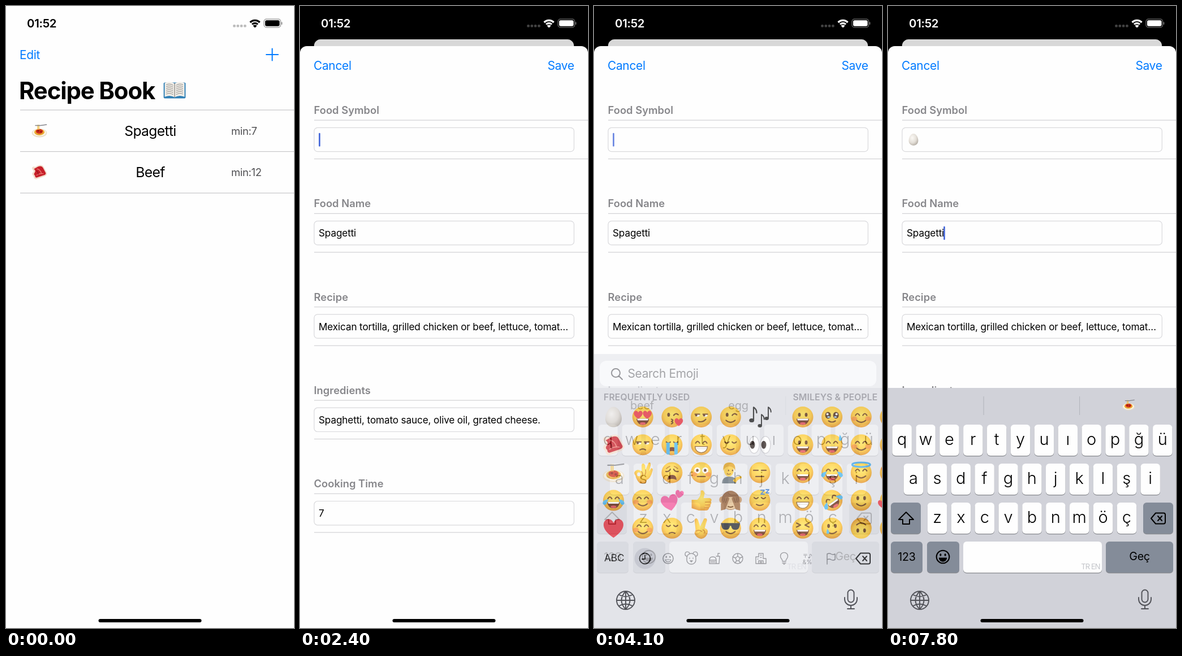
Animation of 509 by 1101 pixels, one loop 8000 ms. Source, as an HTML page:

```html
<!DOCTYPE html>
<html lang="en">
<head>
<meta charset="utf-8">
<title>Recipe Book</title>
<style>
  html, body { margin: 0; width: 100%; height: 100%; overflow: hidden; background: #000; }
  svg { display: block; width: 100vw; height: 100vh; }
  text { font-family: Inter, Roboto, sans-serif; font-optical-sizing: none; white-space: pre; }
  .ln { fill: none; stroke-linecap: round; stroke-linejoin: round; }
  .icon { fill: none; stroke-linecap: round; stroke-linejoin: round; }
  .key { fill: #fefefe; }
  .fn { fill: #a9aeb8; }
  .late .fn { fill: #848c99; }
</style>
</head>
<body>
<svg id="stage" viewBox="0 0 509 1101" preserveAspectRatio="none"></svg>
<script>
const LOOP = 8000, STEP = 100;
const BLUE = '#007aff', BROWN = '#5f3210';
const stage = document.getElementById('stage');

// Drawing helpers
const range = n => [...Array(n).keys()];
const path = (d, fill) => `<path d="${d}" fill="${fill}"/>`;
const ln = (d, color = '#6b3a10', w = 2.2) => `<path class="ln" d="${d}" stroke="${color}" stroke-width="${w}"/>`;
const oval = (x, y, rx, ry, fill, more = '') => `<ellipse cx="${x}" cy="${y}" rx="${rx}" ry="${ry}" fill="${fill}" ${more}/>`;
const rect = (x, y, w, h, rx, fill, more = '') => `<rect x="${x}" y="${y}" width="${w}" height="${h}" rx="${rx}" fill="${fill}" ${more}/>`;
const rule = (x1, y, x2, color) => rect(x1, y, x2 - x1, 1.2, 0, color);
const pair = s => `${s}<g transform="scale(-1 1)">${s}</g>`;
const at = (x, y, s, k = 1, turn = 0) => `<g transform="translate(${x} ${y}) rotate(${turn}) scale(${k})">${s}</g>`;
const use = (name, x, y, k = 1, id = '') => `<use ${id && `id="${id}"`} href="#${name}" transform="translate(${x} ${y}) scale(${k})"/>`;
const icon = (x, y, d, color, w = 2, k = 1) => at(x, y, `<path class="icon" d="${d}" stroke="${color}" stroke-width="${w}"/>`, k);
const txt = (x, y, s, size, fill = '#000', { weight = 400, anchor = 'start', space = -.015 } = {}) =>
  `<text x="${x}" y="${y}" font-size="${size}" fill="${fill}" font-weight="${weight}" text-anchor="${anchor}" style="letter-spacing:${space}em">${s}</text>`;
const mid = { anchor: 'middle' };

// Emoji parts, drawn in a box from -20 to 20
const heartPath = 'M0 17C-27-1-17-17-8-16Q-2-15 0-9Q2-15 8-16C17-17 27-1 0 17Z';
const heart = (color = '#ee3440') => path(heartPath, color);
const eyes = {
  dot: pair(oval(6, -4, 2.4, 3.6, BROWN)),
  happy: pair(ln('M3-3Q6.5-9 10-3')),
  shut: pair(ln('M3-5Q6.5-1 10-5')),
  flat: pair(ln('M3-4H11')),
  squint: pair(ln('M11-9L4-5.5 11-2')),
  droop: pair(ln('M3-6Q5-1 11-2') + ln('M4-11Q7-10 10-7', '#b3701a', 1.6)),
  side: pair(oval(7, -3, 4, 2.6, '#fff') + ln('M3-5H11')) + oval(5, -3, 2, 2, BROWN) + oval(-9, -3, 2, 2, BROWN),
  wide: pair(oval(7, -4, 5.5, 5.5, '#fff') + oval(7, -4, 2.3, 2.6, BROWN)),
  wet: pair(oval(7, -3, 5, 6, '#4a2a12') + oval(8, -5, 2, 2, '#fff') + oval(6, 0, 2.5, 1.5, '#9ecdf0')),
  wink: oval(-6, -4, 2.4, 3.6, BROWN) + ln('M3-3Q6.5-8 11-4'),
  love: pair(at(8, -4, heart(), .44))
};
const bowl = 'M-11 3H11A11 11 0 0 1-11 3Z';
const mouths = {
  smile: ln('M-8 6Q0 13 8 6'),
  small: ln('M-6 7Q0 11 6 7'),
  open: path(bowl, '#64270f') + path('M-10 3H10L9 6H-9Z', '#fff') + oval(0, 11.5, 5, 2.3, '#e5484f'),
  teeth: `<path d="${bowl}" fill="#fff" stroke="#8a5a24" stroke-width="1.4"/>` + ln('M-9 7H9', '#c9c2ba', .8),
  flat: ln('M-7 7H7'),
  frown: ln('M-5 9Q0 6 5 9'),
  smirk: ln('M-5 8Q3 10 8 4'),
  kiss: ln('M-1 4q5 1.5 0 4q5 1.5 0 4'),
  gape: path('M-8 13Q-8 4 0 4T8 13Q0 9-8 13Z', '#64270f')
};
const blush = pair(oval(12, 3, 5, 4, '#f0522f', 'opacity=".45"'));
const tear = '#45b4ee';
const tears = pair(path('M9-2Q20-1 19 6Q15 11 12 5Z', tear));
const face = (eye, mouth, more = '') => oval(0, 0, 18.5, 18.5, 'url(#skin)') + eyes[eye] + mouths[mouth] + more;
const joy = face('happy', 'open', tears);
const note = ln('M0 8V-12Q5-9 5-3', '#222', 2) + oval(-3, 9, 4, 3.2, '#222');

const art = {
  egg: path('M0-18C9-18 14.5-5 14.5 3C14.5 12 8 18 0 18S-14.5 12-14.5 3C-14.5-5-9-18 0-18Z', 'url(#shell)'),
  pasta: oval(0, 6, 19, 11, '#eadfca') + oval(0, 5, 17, 9, '#fbf5e6') + oval(0, 4, 13, 8, '#efb33a') +
    ln('M-11 6Q-6 12 0 10T11 6', '#d98f22', 1.4) + oval(0, 2, 9, 6, '#cf2f1b') + oval(-3, 1, 2.6, 2, '#8c1a12') + oval(4, 3, 2.4, 2, '#8c1a12') +
    ln('M-4-3V-14M-1-3V-14', '#efc04c', 2) + ln('M-10-13H3L18-15', '#85868c', 2.2),
  meat: path('M-19-10Q-17-16-11-13L-3-17Q7-20 11-13L19 2Q20 8 12 11L-7 18Q-14 18-14 12L-18 6Q-19 2-14-1Z', '#f3dccb') +
    path('M-14-8L-3-14Q6-17 9-11L16 2Q17 6 11 8L-7 14Q-11 14-11 9Q-16 6-11 0Q-9-5-14-8Z', '#c71f29') +
    ln('M-6-8Q2-7 5 3M-7 8Q0 3 10 4', '#ee8078', 1.6) + ln('M-7-3Q-2 0-3 6', '#8c121b', 1.6),
  heart: heart(),
  love: face('love', 'open'),
  kiss: face('wink', 'kiss', at(12, 9, heart(), .42)),
  smirk: face('side', 'smirk'),
  wink: face('wink', 'smile'),
  unamused: face('side', 'frown'),
  sob: face('shut', 'gape', pair(path('M4-4H10V16Q7 18 4 17Z', tear))),
  beam: face('happy', 'teeth'),
  relieved: face('shut', 'small'),
  weary: face('droop', 'gape'),
  flushed: face('wide', 'flat', blush),
  blank: face('flat', 'flat'),
  joy,
  rofl: at(0, 0, joy, 1, -35),
  blush: face('happy', 'smile', blush),
  pensive: face('shut', 'frown'),
  laugh: face('happy', 'open'),
  grin: face('dot', 'open'),
  squint: face('squint', 'open'),
  teary: face('wet', 'small'),
  sweat: face('happy', 'open', path('M14-18Q20-9 15-7T14-18Z', tear)),
  angel: face('happy', 'smile', oval(0, -14, 16, 4, 'none', 'stroke="#3aa5ea" stroke-width="3"')),
  slight: face('dot', 'smile'),
  smiletear: face('dot', 'smile', path('M-8 1Q-2 9-7 10T-8 1Z', tear)),
  upside: at(0, 0, face('dot', 'smile'), 1, 180),
  adore: face('happy', 'smile', blush + at(-15, 6, heart(), .4) + at(-9, 14, heart(), .35)),
  sleep: face('shut', 'small') + ln('M2-18H8L2-11H8M11-19H16L11-13H16', '#3977c9', 2),
  cool: face('dot', 'smile', path('M-17-9H17L16-4Q15 3 8 3Q2 3 1-4H-1Q-2 3-8 3Q-15 3-16-4Z', '#23272d')),
  notes: at(-11, -4, note, 1.1) + at(3, 7, note, .95) + at(15, -6, note, .95),
  eyes: pair(oval(10, 0, 9, 15, '#fff', 'stroke="#c9c9ce" stroke-width="1.4"')) + oval(-13, 0, 4.5, 7, '#2f2420') + oval(7, 0, 4.5, 7, '#2f2420'),
  loves: at(-4, 4, heart('#f2559a'), .85, -12) + at(13, -11, heart('#f2559a'), .42, 12),
  ok: path('M-5 19Q-11 14-13 5Q-17 0-13-3Q-8-7-2-2L-2-14Q1-19 4-13L5-5L10-17Q14-20 14-13L11-2L15-8Q19-8 17-2Q14 10 7 13L5 19Z', 'url(#skin)') +
    oval(-7, 3, 3, 3.4, '#e9eaef') + ln('M-2-2Q2 4-3 9M5-5Q6 0 4 4', '#c9750f', 1.4),
  thumb: path('M-17-1H-7Q0-8-1-17Q4-20 6-12L4-4H15Q20-2 17 2Q19 5 16 8Q17 11 14 13Q13 18 8 18H-4L-17 14Z', 'url(#skin)') +
    ln('M7 3H16M7 8H15M6 13H13', '#c9750f', 1.4),
  peace: path('M-10 3L-12-15Q-9-20-6-15L-2-3L5-17Q10-19 10-14L6 0Q13 2 11 9Q8 18 0 19Q-9 18-12 9Z', 'url(#skin)') +
    ln('M-9 5Q-3 2 1 6M3 3Q8 5 5 9', '#c9750f', 1.4),
  person: path('M-15 19Q-15 7-2 7T10 19Z', '#66727c') + oval(-3, -4, 8.5, 11, '#fbcb3c') + path('M-13-3Q-14-18-2-18T8-3Q6-11-2-11T-13-3Z', '#e2a31e') +
    pair(oval(3.5, -4, 1, 1.5, BROWN)) + ln('M-6 2Q-3 4 0 2', '#8a4d16', 1.3) + path('M4 14L10 8L19 6L20 9L13 13L9 18Z', '#fbc02d'),
  monkey: pair(oval(15, -1, 5, 6, '#c99562')) + oval(0, 0, 16, 17, '#8a5631') + oval(0, 5, 13, 11, '#e3bd8c') + ln('M-4 11Q0 13 4 11') +
    pair(path('M17 18L9 16L2-3Q5-8 9-6L17 6Z', '#9b653a') + ln('M6-4L9 4M10-3L12 3', '#6d4223', 1.2)),
  book: rect(-20, -14, 40, 29, 2, '#2f7fb5') + path('M0-12Q-9-18-18-13V12Q-8 8 0 13Q8 8 18 12V-13Q9-18 0-12Z', '#f2efe9') +
    ln('M0-12V13', '#8d8a85', 1.4) + pair(range(6).map(i => ln(`M3 ${-9 + i * 3.4}Q9 ${-13 + i * 3.4} 15 ${-10 + i * 3.4}`, '#85827d', 1)).join(''))
};

const defs = `<defs>
  <radialGradient id="skin" cx=".5" cy=".38" r=".64"><stop offset="0" stop-color="#ffe552"/><stop offset=".6" stop-color="#fdc62e"/><stop offset="1" stop-color="#df861a"/></radialGradient>
  <radialGradient id="shell" cx=".38" cy=".35" r=".7"><stop offset="0" stop-color="#fbf9f5"/><stop offset=".6" stop-color="#e4dfd8"/><stop offset="1" stop-color="#b5aea5"/></radialGradient>
  ${Object.entries(art).map(([name, s]) => `<g id="${name}">${s}</g>`).join('')}</defs>`;

// Recipe list
const recipe = (y, food, name, time) => use(food, 59, y, .7) +
  txt(255, y + 9, name, 24.6, '#000', { ...mid, space: -.025 }) + txt(398, y + 7, time, 18.4, '#505053') + rule(25, y + 36.5, 509, '#c8c8ca');
const home = `<g id="home">${rect(0, 0, 509, 1101, 0, '#fefefe', 'class="card"')}
  ${txt(24, 93.5, 'Edit', 20.9, BLUE)}${icon(470.5, 86, 'M-10.5 0H10.5M0-10.5V10.5', BLUE, 2)}
  ${txt(23, 164.5, 'Recipe Book', 41.8, '#000', { weight: 700, space: -.026 })}${use('book', 298, 149, .97)}
  ${rule(25, 183.5, 509, '#c8c8ca')}${recipe(220.5, 'pasta', 'Spagetti', 'min:7')}${recipe(294, 'meat', 'Beef', 'min:12')}
  <g id="dim">${rect(0, 0, 509, 1101, 0, '#000', 'class="card"')}</g></g>`;

// Edit sheet
const fieldTop = i => 215 + i * 165.3;
const field = ([label, value], i) => {
  const y = fieldTop(i);
  return txt(24.5, y - 24, label, 18.4, '#87878b', { weight: 600, space: 0 }) + rule(25, y - 13.5, 509, '#d2d2d5') +
    rect(25, y + .3, 459.3, 42.3, 6, '#fefefe', 'stroke="#d9d9dc" stroke-width="1.2"') +
    txt(33, y + 28, value, 17.2, '#000', { space: -.009 }) + rule(25, y + 55, 509, '#d2d2d5');
};
const form = [
  ['Food Symbol', ''], ['Food Name', 'Spagetti'],
  ['Recipe', 'Mexican tortilla, grilled chicken or beef, lettuce, tomat…'],
  ['Ingredients', 'Spaghetti, tomato sauce, olive oil, grated cheese.'], ['Cooking Time', '7']
];
const sheet = `<g id="sheet"><path id="page" fill="#fefefe"/>
  ${txt(24, 113, 'Cancel', 20.9, BLUE)}${txt(484.5, 113, 'Save', 20.9, BLUE, { anchor: 'end' })}
  ${form.map(field).join('')}
  ${use('pasta', 46, 236.5, .55, 'oldSymbol')}${use('egg', 45, 236.5, .58, 'newSymbol')}
  ${rect(-1.3, 0, 2.6, 24, 1.3, '#3f63d8', 'id="cursor"')}</g>`;

// Letter keyboard
const key = (x, y, w, type = 'key') => rect(x, y + 1.3, w, 55, 6, '#898b90') + rect(x, y, w, 55, 6, '#fefefe', `class="${type}"`);
const keyRow = (letters, first, y) => [...letters].map((c, i) => {
  const x = first + i * 41.87;
  return key(x - 17.2, y, 34.4) + txt(x, y + 36, c, 29, '#000', { ...mid, weight: 300, space: 0 });
}).join('');
const erase = 'M-5-9.5H9Q12-9.5 12-6.5V6.5Q12 9.5 9 9.5H-5L-13 0ZM-1-4L6 4M6-4L-1 4';
const smiley = mouth => oval(0, 0, 11, 11, 'none', 'stroke="currentColor" stroke-width="2"') +
  pair(oval(4, -3.5, 1.5, 2.2, 'currentColor')) + path('M-7 1.5H7A7 7 0 0 1-7 1.5Z', mouth);
const tools = icon(56, 1052, 'M-16 0A16 16 0 0 1 16 0A16 16 0 0 1-16 0ZM0-16V16M-16 0H16M0-16Q-15 0 0 16Q15 0 0-16M-12-10Q0-3 12-10M-12 10Q0 3 12 10', '#515258', 1.9) +
  icon(454, 1051, 'M-5.5-12A5.5 5.5 0 0 1 5.5-12V-1A5.5 5.5 0 0 1-5.5-1ZM-11-4V-1A11 11 0 0 0 11-1V-4M0 10V16M-6 16H6', '#515258', 1.9);
const letters = `<g id="letters">${rect(0, 676, 509, 425, 0, '#d1d2d9')}
  ${[169, 338.5].map(x => rect(x - .5, 691, 1.1, 33, 0, '#b4b6bd')).join('')}
  <g id="words">${txt(85, 714, 'beef', 20, '#000', mid)}${txt(255, 714, 'egg', 20, '#000', mid)}</g>
  ${use('pasta', 425, 706, .57, 'hint')}
  ${keyRow('qwertyuıopğü', 24.7, 741)}${keyRow('asdfghjklşi', 45, 810)}${keyRow('zxcvbnmöç', 87, 879)}
  ${key(5, 879, 53, 'fn')}${key(451, 879, 53, 'fn')}${key(5, 948, 56, 'fn')}${key(69, 948, 57, 'fn')}${key(133, 948, 245)}${key(385, 948, 119, 'fn')}
  ${icon(32, 907, 'M0-11L13 2H6V10H-6V2H-13Z', '#000')}${icon(478, 907, erase, '#000')}
  ${txt(33, 982, '123', 19.7, '#000', mid)}${at(97, 975, smiley('currentColor'), 1.03)}
  ${txt(358, 997, 'TR EN', 13, '#c3c5ca', { ...mid, space: -.07 })}${txt(444.5, 981, 'Geç', 19.7, '#000', mid)}${tools}</g>`;

// Emoji keyboard
const rows = [
  'egg love kiss smirk wink notes grin teary blush wink',
  'meat unamused sob beam relieved eyes grin sweat blush relieved',
  'pasta ok weary flushed person blank laugh joy angel love',
  'joy blush loves thumb monkey sleep beam rofl slight adore',
  'heart blush pensive peace cool laugh squint smiletear upside kiss'
];
const grid = rows.map((row, r) => row.split(' ').map((name, c) =>
  use(name, c < 6 ? 34.5 + 51.7 * c : 369 + 51.6 * (c - 6), 727.5 + 49.2 * r)).join('')).join('');
const categories = [
  'M-8-1A8 8 0 0 1 8-1V3A8 7 0 0 1-8 3ZM-8-4A4 4 0 1 1-3-8M8-4A4 4 0 1 0 3-8M-3-1V0M3-1V0M-2 4H2L0 6Z',
  'M-9 9V3H3V9ZM-9 3Q-9-3-3-3T3 3M-7 6H1M3-4H9L8 9H4M6-4V-9H9',
  'M-9 0A9 9 0 0 1 9 0A9 9 0 0 1-9 0ZM0-4L4-1L2 4H-2L-4-1ZM0-4V-9M4-1L9-3M2 4L5 8M-2 4L-5 8M-4-1L-9-3',
  'M-9 9V-3H-4V-9H4V0H9V9ZM-1-6H1M-1-2H1M-6 1H-5M-4 9V4H4V9M-1 9V6H1V9',
  'M-3 5Q-3 2-5 0A6.5 6.5 0 1 1 5 0Q3 2 3 5ZM-3 8H3M-1 10H1',
  '', 'M-6 10V-8Q-2-10 1-8T8-8V2Q4 4 1 2T-6 2'
];
const GREY = '#7d7e84';
const heading = (x, s) => txt(x, 697.5, s, 15.8, '#9b9ba2', { weight: 600, space: .006 });
const emoji = `<g id="emoji">${rect(0, 616, 509, 485, 0, '#e9eaef')}
  ${rect(10, 628, 489, 45, 12, '#f7f8fb')}${icon(38.5, 649.5, 'M-7.5 0A7.5 7.5 0 1 1 7.5 0A7.5 7.5 0 1 1-7.5 0M5.5 5.5L11.5 11.5', '#76777c')}
  ${txt(59.5, 658, 'Search Emoji', 20.9, '#85868b')}
  ${heading(17, 'FREQUENTLY USED')}${heading(351.5, 'SMILEYS &amp; PEOPLE')}${grid}
  ${txt(18, 983, 'ABC', 17.2, '#111', { space: 0 })}${oval(90, 978, 18.5, 18.5, '#d0d1da')}
  ${icon(90, 978, 'M-9.5 0A9.5 9.5 0 0 1 9.5 0A9.5 9.5 0 0 1-9.5 0M0-6V1H-5', '#111', 1.8)}
  <g color="${GREY}">${at(131, 978, smiley('none'), .82)}${icon(131, 978, 'M-5 2H5Q4 6 0 6T-5 2Z', GREY, 1.2)}</g>
  ${categories.map((d, i) => icon(172 + i * 41, 978, d, GREY, 1.4)).join('')}
  ${txt(377, 977, '〒♪', 9.5, GREY, mid)}${txt(377, 988, '&amp;%', 10.5, GREY, mid)}
  ${icon(476, 978, erase, '#111')}${tools}</g>`;

const status = `<g id="status" fill="currentColor">
  ${txt(37, 38, '01:52', 20.4, 'currentColor', { weight: 600 })}
  ${range(4).map(i => rect(401.2 + i * 6.3, 33, 4.6, 4.6, 1.6, 'currentColor', 'opacity=".26"')).join('')}
  <g fill="none" stroke="currentColor" stroke-width="3.2">${at(440, 37.5, '<path d="M-8.5-8.5A12 12 0 0 1 8.5-8.5M-5-5A7 7 0 0 1 5-5"/>')}</g>
  ${at(440, 37.5, path('M0 1L-3.5-2.5A4.9 4.9 0 0 1 3.5-2.5Z', 'currentColor'))}
  ${rect(456, 23.2, 29.5, 14.6, 4.3, 'none', 'stroke="currentColor" stroke-opacity=".42" stroke-width="1.3"')}
  ${rect(458, 25.2, 25.5, 10.6, 2.8, 'currentColor')}${rect(486.8, 28.3, 1.4, 4.6, .7, 'currentColor', 'opacity=".5"')}</g>`;

stage.innerHTML = defs + home + sheet + `<g id="keyboard">${letters}${emoji}</g>` + status + rect(163.5, 1085, 182, 6, 3, '#000');

// Motion
const $ = Object.fromEntries([...stage.querySelectorAll('[id]')].map(el => [el.id, el]));
const cards = stage.querySelectorAll('.card');
const set = (el, name, value) => el.setAttribute(name, value);
const show = (el, on) => set(el, 'opacity', +on);
// Remaining share of a critically damped spring that starts at the given time.
const spring = (t, start) => {
  const x = Math.max(0, t - start) * .01826;
  return (1 + x) * Math.exp(-x);
};
const held = (t, stops) => stops.reduce((value, [time, next]) => t >= time ? next : value, 0);

const cursorAlpha = [
  [1600, 1], [2100, .5], [2200, 0], [2300, .6], [2400, 1], [2900, .5], [3000, 0], [3200, .7], [3300, 1], [3600, .5], [3700, 0],
  [4000, .4], [4100, .8], [4200, 1], [5400, .5], [5500, 0], [5700, .3], [5800, .7], [5900, 1], [6400, .5], [6500, 0],
  [6700, 1], [7300, .5], [7400, 0], [7700, .5], [7800, 1]
];
const cursorX = [[0, 58], [2300, 34.5], [4600, 58], [6700, 99.5]];
const emojiAlpha = [[4000, .35], [4100, .75], [4200, 1], [6700, .75], [6800, .4], [6900, .1], [7000, 0]];

function render(t) {
  const rest = t < 700 ? 1 : t > 1200 ? 0 : spring(t, 657), p = 1 - rest;
  set($.home, 'transform', `translate(${24.8 * p} ${59 * p}) scale(${1 - .0975 * p})`);
  cards.forEach(el => set(el, 'rx', 13 * p));
  show($.dim, .15 * p);
  $.status.style.color = `rgb(${[p, p, p].map(v => Math.round(255 * v))})`;

  const r = t <= 1100 ? 72 : 0;
  set($.page, 'd', `M0 83A12 12 0 0 1 12 71H497A12 12 0 0 1 509 83V${1101 - r}A${r} ${r} 0 0 1 ${509 - r} 1101H${r}A${r} ${r} 0 0 1 0 ${1101 - r}Z`);
  set($.sheet, 'transform', `translate(0 ${1030 * rest})`);
  show($.oldSymbol, t < 2300);
  show($.newSymbol, t >= 4600);
  set($.cursor, 'transform', `translate(${held(t, cursorX)} ${fieldTop(t < 6700 ? 0 : 1) + 9.7})`);
  show($.cursor, held(t, cursorAlpha));

  set($.keyboard, 'transform', `translate(0 ${t < 2700 ? 500 : t >= 3200 ? 0 : 425 * spring(t, 2660)})`);
  show($.emoji, held(t, emojiAlpha));
  const late = t >= 6700;
  set($.letters, 'class', late ? 'late' : '');
  show($.words, !late);
  show($.hint, late);
}

const start = performance.now();
function tick() {
  const t = (performance.now() - start) % LOOP;
  render(Math.floor(t / STEP) * STEP);
  requestAnimationFrame(tick);
}
tick();
</script>
</body>
</html>
```
